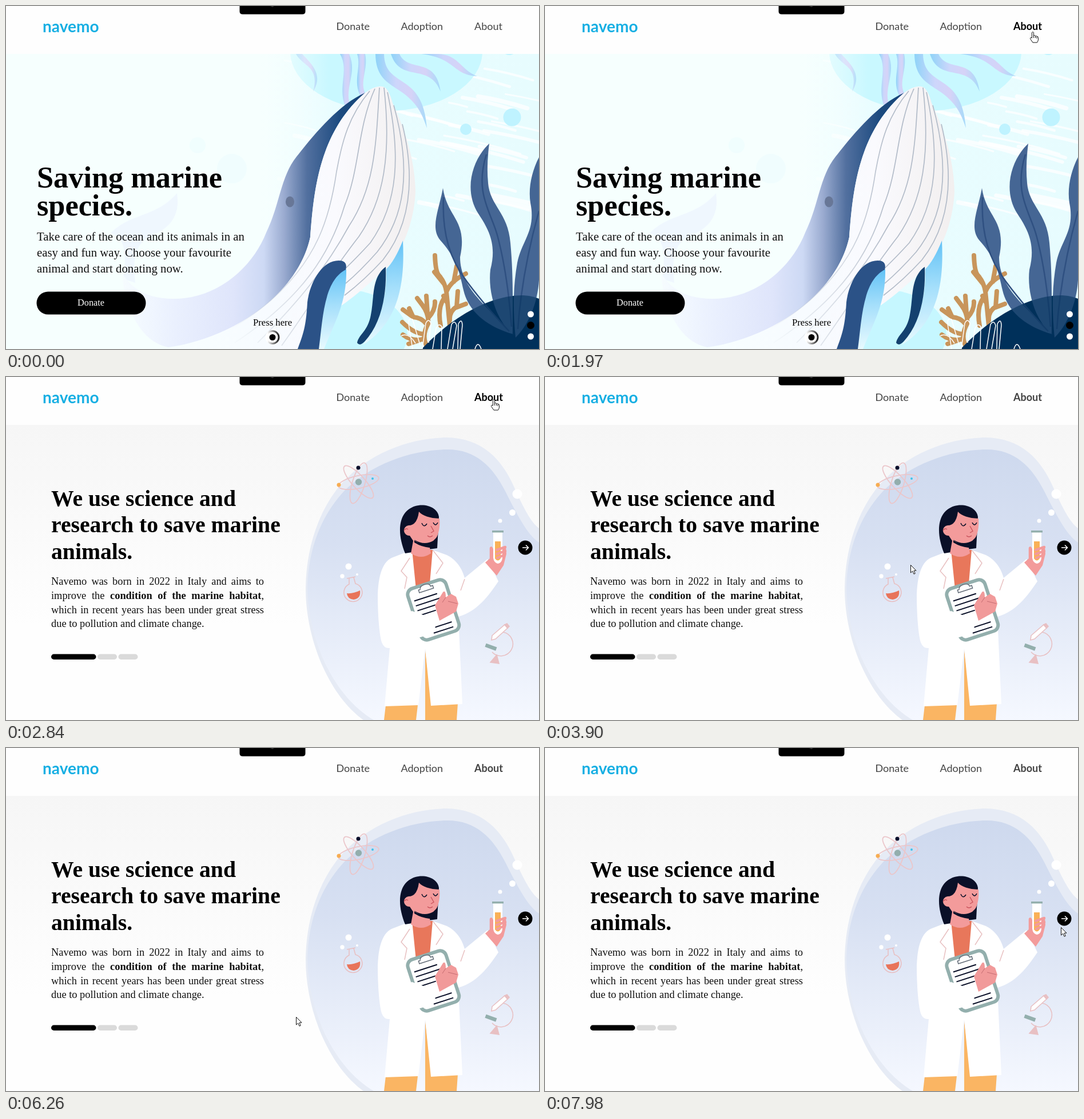
Recreate the animation shown at these times as an HTML page. Size 932 px wide and 601 px high, loop 8 s.

```html
<!DOCTYPE html>
<html lang="en">
<head>
<meta charset="utf-8">
<title>Marine species</title>
<style>
html, body { margin: 0; width: 100%; height: 100%; overflow: hidden; background: #fff; }
svg { position: absolute; left: 0; top: 0; }
text, p { font-family: "Liberation Serif", serif; }
.sans { font-family: Lato, sans-serif; }
.bold { font-weight: 700; }
p { position: absolute; left: 79px; top: 346px; width: 372px; margin: 0; font-size: 18.4px; line-height: 24.8px; color: #111; }
p span { display: block; white-space: nowrap; text-align: justify; text-align-last: justify; }
p span:last-child { text-align-last: left; }
</style>
</head>
<body>
<svg width="932" height="601" viewBox="0 0 932 601">
<defs>
  <linearGradient id="sea"><stop stop-color="#f9fffe"/><stop offset=".45" stop-color="#f4fffe"/><stop offset=".62" stop-color="#e9fdff"/><stop offset="1" stop-color="#e7fcfe"/></linearGradient>
  <linearGradient id="fade" gradientUnits="userSpaceOnUse" x1="445" x2="565" y1="0" y2="0"><stop stop-color="#f6fffe"/><stop offset="1" stop-color="#f6fffe" stop-opacity="0"/></linearGradient>
  <linearGradient id="back" gradientUnits="userSpaceOnUse" x1="185" x2="628" y1="0" y2="0"><stop stop-color="#f8fefe"/><stop offset=".1" stop-color="#f3f9ff"/><stop offset=".25" stop-color="#eaf0fe"/><stop offset=".48" stop-color="#dfe5fb"/><stop offset=".6" stop-color="#cdd9f4"/><stop offset=".68" stop-color="#9aabd0"/><stop offset=".77" stop-color="#52709f"/><stop offset=".9" stop-color="#1d4b80"/><stop offset="1" stop-color="#154477"/></linearGradient>
  <linearGradient id="belly" gradientUnits="userSpaceOnUse" x1="250" x2="716" y1="0" y2="0"><stop stop-color="#f8ffff"/><stop offset=".45" stop-color="#f7fbff"/><stop offset=".7" stop-color="#fafafe"/><stop offset="1" stop-color="#f2efef"/></linearGradient>
  <linearGradient id="pleat" gradientUnits="userSpaceOnUse" x1="390" x2="600" y1="0" y2="0"><stop stop-color="#b2bbc8" stop-opacity="0"/><stop offset=".6" stop-color="#b2bbc8" stop-opacity=".5"/><stop offset="1" stop-color="#b2bbc8"/></linearGradient>
  <linearGradient id="fin" x2="0" y2="1"><stop stop-color="#62c2f6"/><stop offset=".45" stop-color="#a5dffb"/><stop offset="1" stop-color="#e8faff"/></linearGradient>
  <linearGradient id="arm"><stop stop-color="#8fd3f8"/><stop offset=".4" stop-color="#cdd6fb"/><stop offset=".7" stop-color="#d6d3f7"/><stop offset="1" stop-color="#a5daf9"/></linearGradient>
  <linearGradient id="ring"><stop offset=".1" stop-color="#fff"/><stop offset=".5" stop-color="#999"/><stop offset="1" stop-color="#222"/></linearGradient>
  <linearGradient id="paper" x2="0" y2="1"><stop stop-color="#f6f6f6"/><stop offset=".68" stop-color="#fefefe"/></linearGradient>
  <linearGradient id="cloud" x2="0" y2="1"><stop stop-color="#ced9ee"/><stop offset=".35" stop-color="#d7e0f2"/><stop offset="1" stop-color="#f5f8ff"/></linearGradient>
  <clipPath id="stage"><path d="M0 84H932V601H0z"/></clipPath>
  <path id="rock" d="M727 601C765 560 835 506 905 507Q921 508 932 513V601z"/>
</defs>

<g id="home" clip-path="url(#stage)">
  <path fill="url(#sea)" d="M0 84H932V601H0z"/>
  <g id="brush" stroke="#fff" stroke-linecap="round"></g>
  <ellipse cx="665" cy="80" rx="168" ry="104" fill="#c9f8ff"/>
  <ellipse cx="590" cy="575" rx="112" ry="78" fill="#c6f7ff"/>
  <g fill="url(#arm)">
    <path d="M507 84C520 107 549 105 537 150C556 119 533 101 518 84z"/>
    <path d="M584 84C602 115 576 145 597 184L604 180C588 145 616 120 600 84z"/>
    <path d="M614 84C622 108 605 132 621 160L629 154C617 134 634 111 628 84z"/>
    <path d="M646 84C647 157 711 128 736 214C729 113 662 146 661 84z"/>
    <path d="M673 84C690 136 740 98 760 150C752 87 703 118 688 84z"/>
    <path d="M726 84C787 91 780 121 824 123C795 112 791 85 756 84z"/>
  </g>
  <path fill="url(#fade)" d="M0 84H565V601H0z"/>
  <g fill="#bff3ff"><circle cx="885" cy="195" r="15.5"/><circle cx="804" cy="216" r="10"/><ellipse cx="880" cy="82" rx="8" ry="4"/><g opacity=".1"><circle cx="335" cy="244" r="14"/><circle cx="395" cy="285" r="26"/></g></g>

  <path fill="#eaf0ff" opacity=".5" d="M299 328C303 355 298 385 255 402C226 414 221 445 226 485L205 478C212 430 207 405 183 398C218 362 262 371 299 328z"/>
  <path fill="url(#back)" d="M628 152C580 173 535 230 508 264C480 299 479 348 455 397C432 456 372 513 293 513C253 513 222 500 203 468C206 520 231 588 284 598C409 580 512 498 532 405C538 325 547 222 628 152z"/>
  <path fill="url(#belly)" d="M628 152Q646 139 658 141Q669 143 676 170C698 217 715 270 716 325C714 379 692 433 664 461C634 486 610 510 583 527L510 601H275C409 580 512 498 532 405C538 325 547 222 628 152z"/>
  <g fill="none" stroke="url(#pleat)" stroke-width="1.700">
    <path d="M636 149C600 192 588 235 578 290C565 380 540 440 480 500Q430 550 355 585"/>
    <path d="M645 145C614 214 619 285 592 350C567 433 520 510 400 590"/>
    <path d="M653 143C647 240 646 315 600 385C560 459 510 520 440 590"/>
    <path d="M661 143C674 260 661 340 617 404C568 467 525 535 482 595"/>
    <path d="M667 151C690 260 687 344 637 415Q594 462 560 490"/>
    <path d="M678 174C710 290 697 370 649 431Q620 464 594 486"/>
    <path d="M693 207C715 298 710 380 659 445Q627 480 592 507"/>
  </g>
  <ellipse cx="496.500" cy="343" rx="7.500" ry="9.500" fill="#687797"/>
  <path fill="url(#fin)" d="M595 461C596 520 576 551 556 601H546C548 551 553 475 595 461z"/>
  <path fill="#2b5287" d="M594 462C597 451 592 446 582 446C551 446 531 487 527 519C525 555 522 570 510 601H547C554 550 555 482 594 462z"/>
  <path fill="url(#fin)" d="M694 411C697 475 692 551 624 594C650 557 666 520 665 461Q680 446 694 411z"/>
  <path fill="#14416f" d="M664 457C639 475 644 511 638 541C633 570 617 575 614 590Q618 597 627 588C656 557 666 507 664 457z"/>

  <g fill="none" stroke="#c8955b" stroke-width="8" stroke-linecap="round" stroke-linejoin="round">
    <path d="M776 560L770 500Q767 483 757 472Q751 466 750 437M771 499Q778 482 804 469M783 483L788 456M766 487L749 466M770 518L765 508M776 550Q775 535 788 527L790 500M788 528L804 522"/>
    <path d="M738 600Q725 580 738 557Q740 540 728 524L719 512M735 508L737 538M750 518Q751 532 739 546M734 556Q726 546 712 545L694 532M712 545L705 530M731 575Q713 574 693 554M728 584Q710 588 694 576M722 586L704 592M760 560Q754 530 766 512"/>
  </g>
  <use href="#rock" fill="#00315b"/>
  <g fill="#456694">
    <path d="M764 319C758 355 741 388 759 410C788 442 793 466 800 498C808 534 840 562 887 575C842 528 794 494 794 440C808 375 772 372 764 319z"/>
    <path d="M845 241C816 268 799 322 826 364C846 394 858 420 847 462C842 505 860 555 886 574C886 510 887 470 882 415C878 362 846 350 843 310Q840 280 845 241z"/>
    <path d="M932 265C919 290 913 320 917 345C927 394 902 410 894 450C887 490 886 530 891 581C913 560 930 520 932 480z"/>
  </g>
  <g fill="none" stroke="#2f5081" stroke-width="2.500">
    <path d="M765 335C762 400 777 445 806 483Q838 526 880 570M840 260C818 330 850 363 860 405Q877 470 884 562M932 359Q902 466 895 566"/>
  </g>
  <use href="#rock" fill="#00315b" opacity=".58"/>
  <g fill="none" stroke="#fff" stroke-width="1.500">
    <path d="M711 601L704 557Q703 546 711 549L724 594M728 601L734 556Q739 546 743 556L739 590M746 601L752 565Q757 554 762 562L761 601M772 601L779 558Q785 549 788 560L781 601M790 601L791 557Q797 546 798 559L794 601M820 601Q825 585 831 601M691 578Q704 571 716 591"/>
  </g>
  <circle cx="917.500" cy="540" r="5.500" fill="#fff"/><circle cx="917.500" cy="559.500" r="6.500"/><circle cx="917.500" cy="579" r="5.500" fill="#fff"/>

  <g class="bold" font-size="52.300"><text x="54" y="318">Saving marine</text><text x="54" y="367">species.</text></g>
  <g font-size="20.800" fill="#111"><text x="54" y="411">Take care of the ocean and its animals in an</text><text x="54" y="439">easy and fun way. Choose your favourite</text><text x="54" y="467">animal and start donating now.</text></g>
  <rect x="53.500" y="500.500" width="191" height="40" rx="20"/>
  <text x="148.500" y="525" font-size="16.300" text-anchor="middle" fill="#fff">Donate</text>
  <text x="466" y="560" font-size="16.700" text-anchor="middle">Press here</text>
  <circle cx="466" cy="580.500" r="11" fill="#fff" stroke="url(#ring)" stroke-width="3"/><circle cx="466" cy="580.500" r="5.500"/>
</g>

<g id="about">
  <path fill="url(#paper)" d="M0 84H932V601H0z"/>
  <path fill="#e6ebf5" d="M770 106C832 107 867 143 889 194C906 232 919 256 932 265V601H625C565 558 524 460 524 370C525 300 546 236 584 190C635 131 708 107 770 106z"/>
  <path fill="url(#cloud)" d="M770 127C821 126 851 157 873 200C895 244 913 278 932 290V601H643C571 558 529 460 527 370C529 293 555 239 592 199C641 151 709 128 770 127z"/>
  <g fill="#fff"><circle cx="894" cy="205" r="8.500"/><circle cx="885.500" cy="237.500" r="5.500"/><circle cx="864" cy="252" r="3.500"/><circle cx="599" cy="332" r="5.500"/><circle cx="588" cy="349" r="3.700"/><circle cx="614" cy="346" r="2"/></g>

  <g fill="none" stroke="#ebc6ca" stroke-width="1.800">
    <ellipse cx="616.500" cy="184" rx="36" ry="11" transform="rotate(-12 616.500 184)"/>
    <ellipse cx="616.500" cy="184" rx="37" ry="11" transform="rotate(48 616.500 184)"/>
    <ellipse cx="616.500" cy="186" rx="37" ry="11" transform="rotate(107 616.500 186)"/>
  </g>
  <circle cx="616.500" cy="184" r="5.700" fill="#93aead"/><circle cx="616" cy="159" r="3.500" fill="#0b102c"/><circle cx="582" cy="189" r="3.500" fill="#f7ad52"/><circle cx="641" cy="178" r="2" fill="#41c3ea"/>
  <g fill="none" stroke="#e8c0c3" stroke-width="1.600">
    <path d="M600 352V363A16 16 0 1 0 611 362L608 351M596 353L611 350"/>
    <path d="M869 447A21 21 0 1 1 850 482"/>
    <path fill="#fff" d="M850 453L872 434L877 440L856 459L849 461z"/>
    <path fill="#e8c0c3" d="M872 434L876 432L880 437L877 440zM858 487L847 500L862 502z"/>
  </g>
  <path fill="#e8745a" d="M596 379Q607 380 619 374Q621 388 608 390Q597 389 596 379z"/>
  <rect x="838" y="470" width="20" height="6.500" fill="#93afad" transform="rotate(20 848 473)"/>

  <path fill="#fab563" d="M664 575H720L717 601H661zM733 478L745 574L790 572L788 601H733z"/>
  <path fill="#e8775b" d="M707 303H747V370H716z"/>
  <path fill="#fff" d="M710 303L674 317C656 326 651 354 650 382C650 410 652 447 657 465Q661 476 671 475L662 577L721 575L733 476L743 576L798 573L791 420C824 411 844 383 861 358L842 319L802 352C796 330 783 318 771 312L746 303L741 362L717 372z"/>
  <path fill="none" stroke="#e8c0c1" stroke-width="1.500" d="M706 317L691 340L701 351L697 371M746 303L764 326L752 345M802 354L795 374M689 427L700 417"/>
  <path fill="#0a1028" d="M698 309C686 280 684 247 704 232C724 217 755 226 757 245L754 300Q736 302 716 306z"/>
  <path fill="#f39b9b" d="M722 236Q732 247 758 248C760 269 753 292 738 294Q725 295 714 286V290Q727 298 741 299L743 309Q726 321 708 309L712 287L706 278A9 9 0 1 1 704 260Q719 260 722 236z"/>
  <path fill="#0a1028" d="M714 285Q731 296 747 287L754 280V300Q729 300 714 285z"/>
  <path fill="none" stroke="#0a1028" stroke-width="1.500" d="M727 256Q731 265 736 257M747 255Q751 263 755 255"/>
  <path fill="none" stroke="#c9545d" stroke-width="1.400" d="M743 261L748 270L743 273M737 278Q741 282 746 278M696 269Q699 264 703 267"/>

  <g transform="rotate(-18 747 407)">
    <rect x="712" y="361" width="70" height="94" rx="11" fill="#fff" stroke="#93afad" stroke-width="6"/>
    <path fill="#fff" stroke="#646d78" stroke-width="1.500" d="M733 367H736Q737 361 746 361Q755 361 755 367H759V372H733z"/>
    <path stroke="#0a1028" stroke-width="2" d="M720 383H762M720 392H767M720 401H765M720 410H751M735 438H771M735 447H771"/>
  </g>
  <path fill="#fff" d="M680 420L710 410L752 425L750 444L728 455L700 462L672 440z"/>
  <path fill="#f19a9a" d="M758 427L750 400L764 377Q769 372 769 386L778 380L787 385L791 397L787 411Z"/>
  <path fill="none" stroke="#c56c72" d="M769 386L763 395M773 393L789 397"/>

  <path fill="#f39b9b" d="M838 325L847 317L846 299Q850 293 853 305L874 296L875 310L870 330L858 348z"/>
  <path fill="#fff" d="M852 272H868V317Q867 326 860 327Q853 325 852 317z"/>
  <path fill="#f9b158" d="M855 288H865V318Q860 325 855 318z"/>
  <path fill="#93afad" d="M850 269H870V272.500H850z"/>
  <path fill="none" stroke="#f39b9b" stroke-width="4.500" stroke-linecap="round" d="M858 303L873 298M858 310L873 305M859 317L871 312M848 300V320"/>
  <circle cx="908" cy="299" r="12.500"/>
  <path fill="none" stroke="#fff" stroke-width="1.500" d="M903 299H913M909 294.500L913.500 299L909 303.500"/>

  <g class="bold" font-size="39.700"><text x="79" y="226">We use science and</text><text x="79" y="272">research to save marine</text><text x="79" y="318.500">animals.</text></g>
  <rect x="79" y="485.500" width="78.500" height="9.500" rx="4.700"/>
  <g fill="#dadada"><rect x="160" y="485.500" width="34" height="9.500" rx="4.700"/><rect x="196.500" y="485.500" width="34" height="9.500" rx="4.700"/></g>
</g>

<path fill="#fefefe" d="M0 0H932V84H0z"/>
<path d="M408.500 0H523.500V9.500Q523.500 14.500 518 14.500H414Q408.500 14.500 408.500 9.500z"/>
<path fill="#333" d="M462 0H469L466 2z"/>
<text class="sans bold" x="64" y="46" font-size="28" fill="#17afe3">navemo</text>
<g fill="#444" font-size="18"><text class="sans" x="577.500" y="42">Donate</text><text class="sans" x="690.500" y="42">Adoption</text><text class="sans" id="link" x="819" y="42">About</text></g>
</svg>

<p id="story"><span>Navemo was born in 2022 in Italy and aims to</span><span>improve the <b>condition of the marine habitat</b>,</span><span>which in recent years has been under great stress</span><span>due to pollution and climate change.</span></p>

<svg width="932" height="601" viewBox="0 0 932 601">
  <circle id="press" cx="852" cy="38" r="12.500" fill="#000" opacity=".13"/>
  <g id="cursor" fill="#fff" stroke="#111" stroke-linejoin="round">
    <path id="arrow" d="M.5 .5V14L3.700 11L6 16.300L8.200 15.300L6 10.200H10z"/>
    <path id="hand" d="M-1.500 11V1.500Q0 -1 1.500 1.500V7Q3.500 5.500 4.500 7.500Q6.500 6.500 7 8.500Q9.500 8 9.500 10.500V14Q9 17 7.500 19H0L-4.500 12.500Q-5 9.500 -1.500 11zM1.500 7V11M4.500 8V11M7 9V12"/>
  </g>
</svg>

<script>
const $ = id => document.getElementById(id);
const show = (el, on) => el.style.display = on ? "" : "none";

// White brush streaks in the water
let seed = 7;
const rnd = () => (seed = seed * 16807 % 2147483647) / 2147483647;
for (let i = 0; i < 40; i++) {
  const x = 455 + rnd() * 420, y = 95 + rnd() * 270, len = 30 + rnd() * 150;
  const line = document.createElementNS("http://www.w3.org/2000/svg", "path");
  line.setAttribute("d", `M${x} ${y}q${len / 2} ${len * .08} ${len} ${len * .24}`);
  line.setAttribute("fill", "none");
  line.setAttribute("stroke-width", 2 + rnd() * 6);
  line.setAttribute("opacity", .75);
  $("brush").append(line);
}

// Cursor moves: start, end, number of steps, points on the path
const moves = [
  [500, 780, 5, [[631, 625], [645, 432]]],
  [990, 1760, 12, [[645, 432], [583, 325], [715, 184], [852, 68]]],
  [1830, 2030, 4, [[852, 68], [853, 39]]],
  [3290, 4050, 12, [[853, 39], [790, 130], [665, 300], [580, 382]]],
  [4130, 4800, 9, [[580, 382], [554, 432], [504, 471]]],
  [6120, 6260, 3, [[504, 471], [507, 471]]],
  [6870, 7640, 12, [[507, 471], [575, 470], [685, 420], [829, 330]]],
  [7710, 7980, 5, [[829, 330], [902, 314]]]
];

// Catmull-Rom curve through the points
function along(pts, u) {
  const s = u * (pts.length - 1), i = Math.min(Math.floor(s), pts.length - 2), f = s - i;
  const at = k => pts[Math.max(0, Math.min(pts.length - 1, k))];
  return [0, 1].map(c => {
    const [a, b, d, e] = [-1, 0, 1, 2].map(k => at(i + k)[c]);
    return b + f / 2 * (d - a + f * (2 * a - 5 * b + 4 * d - e + f * (3 * (b - d) + e - a)));
  });
}

function cursorAt(t) {
  const move = moves.filter(m => t >= m[0]).pop();
  if (!move) return null;
  const [start, end, n, pts] = move;
  const step = Math.min(n, 1 + Math.floor((t - start) / (end - start) * (n - 1) + .01));
  return along(pts, step / n);
}

function draw(now) {
  const t = now % 8000, second = t >= 2840, pos = cursorAt(t);
  const hover = t >= 1900 && t < 3290;
  show($("home"), !second);
  show($("about"), second);
  show($("story"), second);
  show($("press"), t >= 2560 && t < 2700);
  show($("cursor"), pos);
  show($("hand"), hover);
  show($("arrow"), !hover);
  if (pos) $("cursor").setAttribute("transform", `translate(${pos.map(Math.round)})`);
  $("link").setAttribute("font-weight", hover || second ? 700 : 400);
  $("link").setAttribute("fill", hover ? "#000" : "#444");
  requestAnimationFrame(draw);
}
draw(0);
</script>
</body>
</html>
```
